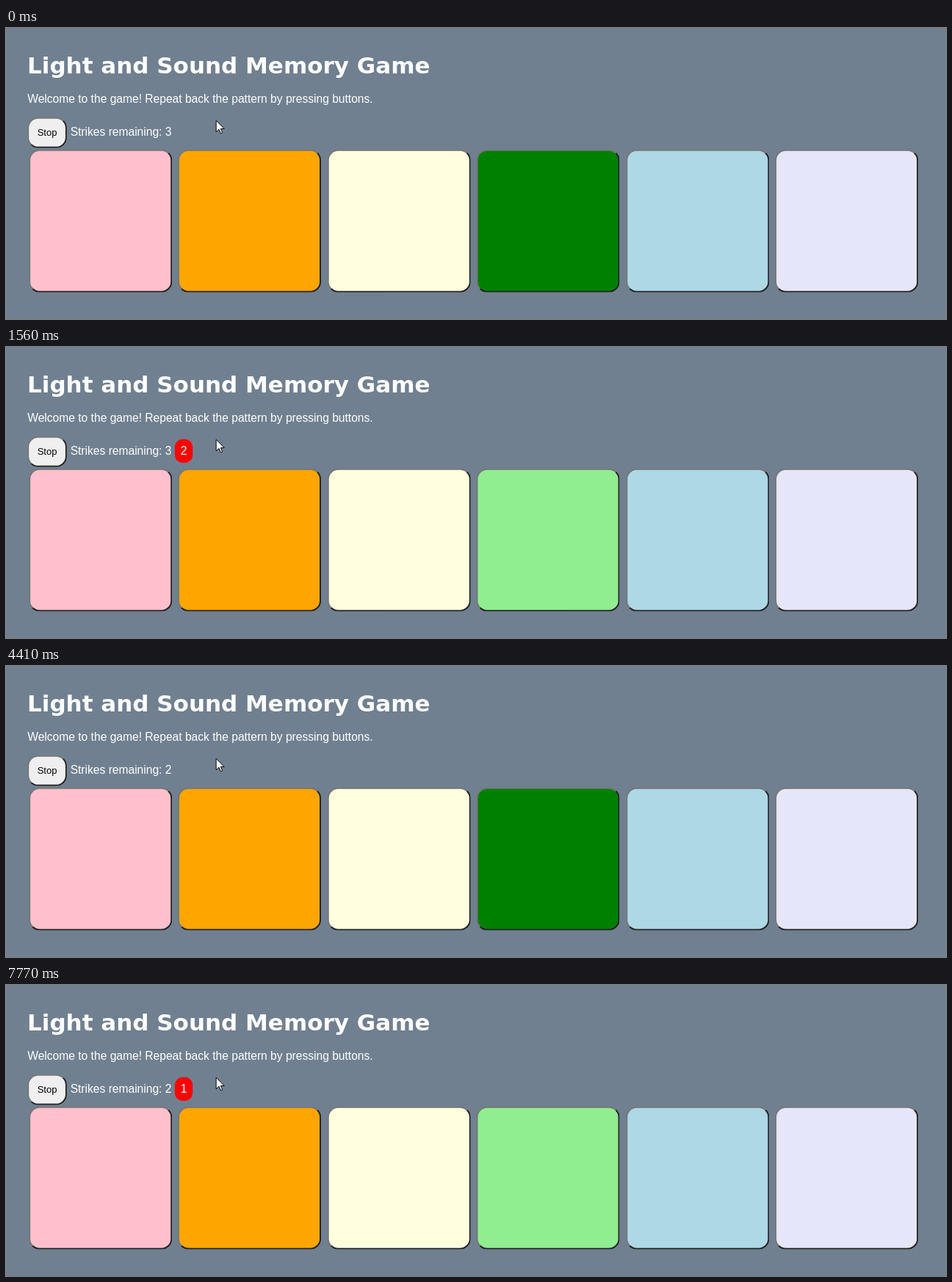
Animation, 1280 px wide and 397 px high, one loop 8 s. Source, as an HTML page:

```html
<!DOCTYPE html>
<html lang="en">
<head>
<meta charset="utf-8">
<title>Light and Sound Memory Game</title>
<style>
  html, body { margin: 0; width: 100%; height: 100%; overflow: hidden; background: slategray; }
  #stage { position: absolute; width: 1313px; height: 408px; transform: scale(.975); transform-origin: 0 0; }
  .button {
    position: absolute; box-sizing: border-box;
    border: 2px solid; border-color: #767676 #222 #222 #767676; border-radius: 15px;
  }
  .tile { top: 170px; width: 200px; height: 200px; }
  #stop { left: 30px; top: 125px; width: 55px; height: 43px; background: #efefef; }
  svg { position: absolute; left: 0; top: 0; }
  text { font: 16px "Liberation Sans", Arial, sans-serif; fill: #fff; }
  .title { font: bold 31.8px "DejaVu Sans", Verdana, sans-serif; }
  .label { font-size: 13.333px; fill: #000; }
</style>
</head>
<body>
<div id="stage">
  <div id="stop" class="button"></div>
  <svg width="1313" height="408">
    <text class="title" x="29.8" y="63.3">Light and Sound Memory Game</text>
    <text x="30" y="105">Welcome to the game! Repeat back the pattern by pressing buttons.</text>
    <text class="label" x="43.8" y="151">Stop</text>
    <text x="89.9" y="151">Strikes remaining: <tspan id="strikes">3</tspan></text>
    <g id="badge">
      <rect x="235.8" y="129" width="24.9" height="33" rx="11" fill="red"/>
      <text id="count" x="243.8" y="151">3</text>
    </g>
    <path transform="translate(293 129)" d="M.5 .5V16.5L4.5 12.9 6.9 18.5 9.2 17.5 6.8 12H11.8Z" fill="#fff" stroke="#000"/>
  </svg>
</div>
<script>
const LOOP = 8000;
const $ = id => document.getElementById(id);

const tiles = ['pink', 'orange', 'lightyellow', 'lightgreen', 'lightblue', 'lavender'].map((color, i) => {
  const tile = document.createElement('div');
  tile.className = 'button tile';
  tile.style.left = Math.round(32 + i * 208.45) + 'px';
  tile.style.background = color;
  $('stage').prepend(tile);
  return tile;
});

// Each event holds until the next: [start ms, strikes, countdown digit, green tile lit]
const events = [
  [0, 3, '', true], [280, 3, ''], [560, 3, 3], [1560, 3, 2], [2520, 3, 1],
  [3450, 2, ''], [4410, 2, '', true], [5410, 2, ''], [5660, 2, 3], [6650, 2, 2], [7770, 2, 1]
];

function draw() {
  const time = performance.now() % LOOP;
  const [, strikes, count, lit] = events.findLast(([start]) => start <= time);
  $('strikes').textContent = strikes;
  $('count').textContent = count;
  $('badge').style.display = count ? '' : 'none';
  tiles[3].style.background = lit ? 'green' : 'lightgreen';
  requestAnimationFrame(draw);
}
draw();
</script>
</body>
</html>
```
